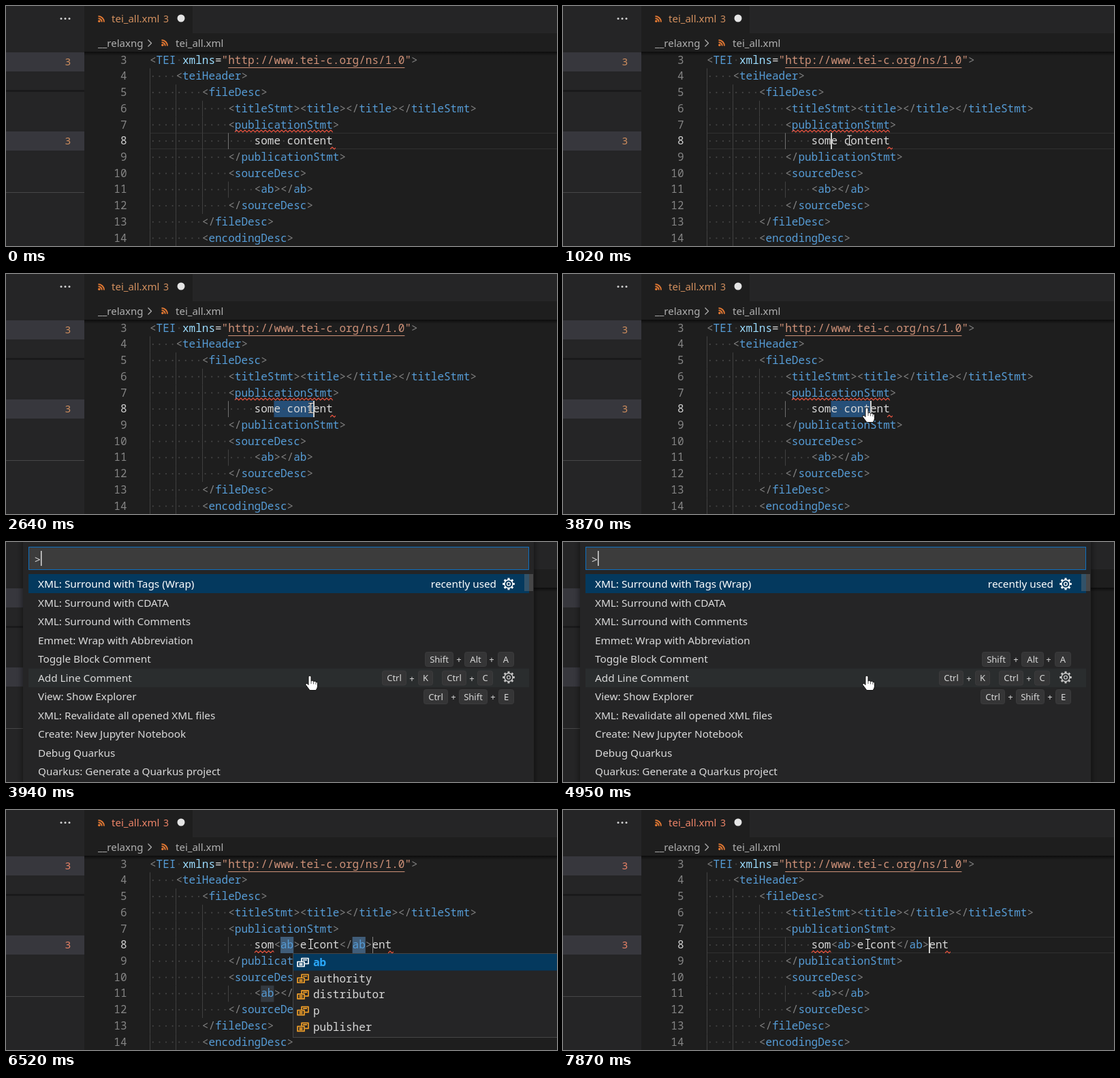
An HTML page with a canvas for the animation above (8 s loop, 809 by 352 pixels).

```html
<!DOCTYPE html>
<html lang="en">
<head>
<meta charset="utf-8">
<title>Surround with tags</title>
<style>
html, body { margin: 0; width: 809px; height: 352px; overflow: hidden; background: #1e1e1e; }
canvas { display: block; }
</style>
</head>
<body>
<canvas id="stage" width="809" height="352"></canvas>
<script>
const ctx = document.getElementById('stage').getContext('2d');
const LOOP = 8000, CHAR = 9.6, LEFT = 211, LINE = 23.73;
const mono = weight => `${weight} 16px "Noto Sans Mono", "DejaVu Sans Mono", monospace`;
const ui = size => `${size}px "Noto Sans", "Open Sans", sans-serif`;
const BLUE = '#569cd6', GREY = '#808080', TEXT = '#d8d8d8', STRING = '#ce9178', RED = '#ee5540';
const MENU = '#dadada';

const colX = col => LEFT + col * CHAR;
const lineY = n => 186.3 + (n - 8) * LINE;

function box(x, y, w, h, color) {
  ctx.fillStyle = color;
  ctx.fillRect(x, y, w, h);
}

function label(str, x, y, color, font, align = 'left') {
  ctx.font = font;
  ctx.textAlign = align;
  ctx.fillStyle = color;
  ctx.fillText(str, x, y);
}

function disc(x, y, r, color) {
  ctx.fillStyle = color;
  ctx.beginPath();
  ctx.arc(x, y, r, 0, 7);
  ctx.fill();
}

function path(d, x, y, color, width, fill) {
  const p = new Path2D(d);
  ctx.save();
  ctx.translate(x, y);
  if (fill) { ctx.fillStyle = fill; ctx.fill(p); }
  ctx.strokeStyle = color;
  ctx.lineWidth = width;
  ctx.lineJoin = 'round';
  ctx.stroke(p);
  ctx.restore();
}

// Editor text

function segments(parts, col, n) {
  for (const [str, color] of parts) {
    label(str, colX(col), lineY(n) + 17, color, mono(500));
    for (let i = 0; i < str.length; i++) if (str[i] === ' ') spaceDot(col + i, n);
    col += str.length;
  }
}

function spaceDot(col, n) {
  disc(colX(col + .5), lineY(n) + 11.8, 1.1, '#454545');
}

function markup(str) {
  let inTag = false;
  return str.match(/<\/?|>|[^<>]+/g).map(s => {
    if (/[<>]/.test(s)) { inTag = s[0] === '<'; return [s, GREY]; }
    return [s, inTag ? BLUE : TEXT];
  });
}

function squiggle(x1, x2, y) {
  ctx.save();
  ctx.beginPath();
  ctx.rect(x1, y - 3, x2 - x1, 6);
  ctx.clip();
  ctx.beginPath();
  for (let x = x1, i = 0; x <= x2 + 3; x += 3, i++) ctx.lineTo(x, y + (i % 2 ? -1.4 : 1.4));
  ctx.strokeStyle = RED;
  ctx.lineWidth = 1.2;
  ctx.stroke();
  ctx.restore();
}

function caret(col) {
  box(Math.round(colX(col)), 186, 2, 24, '#d0d0ce');
}

// Window parts

function feedIcon(x, y) {
  disc(x - 3.2, y + 3.2, 1.7, '#e37933');
  path('M-4.5-.8A5.3 5.3 0 0 1 .8 4.5M-4.5-4A8.5 8.5 0 0 1 4 4.5', x, y, '#e37933', 1.9);
}

function sidebar(badge) {
  box(0, 0, 115, 352, '#252526');
  for (let i = -1; i < 2; i++) disc(87 + i * 6, 18.5, 1.5, '#d0d0d0');
  box(0, 68, 115, 28, '#37373d');
  box(0, 184, 115, 28, '#37373d');
  box(0, 123, 115, 3, '#1a1a1b');
  box(0, 273, 115, 1, '#464647');
  label('3', 91, 87, badge, ui(14.5), 'center');
  label('3', 91, 203, badge, ui(14.5), 'center');
}

function header(badge) {
  box(115, 0, 694, 40, '#252526');
  box(115, 0, 159, 40, '#1e1e1e');
  box(115, 40, 694, 28, '#1e1e1e');
  feedIcon(140, 19);
  label('tei_all.xml', 155, 24, badge, ui(15));
  label('3', 235, 24, badge, ui(14), 'center');
  disc(257, 18, 5.5, '#e4e4e4');
  label('__relaxng', 135, 60, '#b0b0b0', ui(15));
  path('M-2.5-5L2.5 0L-2.5 5', 211, 54.5, '#b0b0b0', 1.3);
  feedIcon(233, 54);
  label('tei_all.xml', 249, 60, '#b0b0b0', ui(15));
  const shade = ctx.createLinearGradient(0, 67, 0, 73);
  shade.addColorStop(0, 'rgba(0,0,0,.6)');
  shade.addColorStop(1, 'rgba(0,0,0,0)');
  box(115, 67, 694, 6, shade);
}

const lines = [
  [0, ''],
  [4, '<teiHeader>'],
  [8, '<fileDesc>'],
  [12, '<titleStmt><title></title></titleStmt>'],
  [12, '<publicationStmt>'],
  [16, ''],
  [12, '</publicationStmt>'],
  [12, '<sourceDesc>'],
  [16, '<ab></ab>'],
  [12, '</sourceDesc>'],
  [8, '</fileDesc>'],
  [8, '<encodingDesc>']
];

function editor(t) {
  const wrapped = t >= 5020, snippet = wrapped && t < 7790;
  box(115, 68, 694, 284, '#1e1e1e');
  if (t < 1650 || t >= 7790) {
    box(LEFT, 186, 598, 1, '#303030');
    box(LEFT, 209, 598, 1, '#303030');
  }
  const picked = [1650, 1800, 2010, 2140, 2290, 2640].filter(at => t >= at).length;
  if (!wrapped) box(colX(19), 186, picked * CHAR, 24, '#264f78');
  if (snippet) {
    box(colX(20), 186, 2 * CHAR, 24, '#405d79');
    box(colX(31), 186, 2 * CHAR, 24, '#405d79');
    box(colX(17), lineY(11), 2 * CHAR, 24, '#343a41');
  }

  lines.forEach(([indent, str], i) => {
    const n = i + 3;
    for (let c = 0; c < indent; c += 4) {
      const active = n === 8 && c === 12 && !wrapped;
      box(Math.round(colX(c)), lineY(n), 1, LINE, active ? '#707070' : '#404040');
    }
    for (let c = 0; c < indent; c++) spaceDot(c, n);
    label(n, 177.5, lineY(n) + 17, n === 8 ? '#d0d0d0' : '#858585', mono(500), 'right');
    if (str) segments(markup(str), indent, n);
  });
  segments([['<', GREY], ['TEI', BLUE], [' ', TEXT], ['xmlns', '#9cdcfe'], ['=', TEXT],
    ['"http://www.tei-c.org/ns/1.0"', STRING], ['>', GREY]], 0, 3);
  box(colX(12), 90, 27 * CHAR, 1, STRING);

  const content = 'som<ab>e cont</ab>ent';
  segments(!wrapped ? [['some content', TEXT]] : t < 5100 ? [[content, TEXT]] : markup(content), 16, 8);

  if (t < 5550) squiggle(colX(13), colX(28), 183.5);
  else squiggle(colX(16), colX(19), 208);
  if (wrapped) squiggle(561, 569, 208.5);
  else squiggle(476, 484, 208.5);

  if (!wrapped) {
    const blinkOff = t < 870 || (t >= 1380 && t < 1650) || (t >= 3150 && t < 3650);
    if (!blinkOff) caret(19 + picked);
  } else if (snippet) {
    box(538, 186, 1, 24, '#858585');
    if (t < 5510 || (t >= 6020 && t < 6520) || (t >= 7080 && t < 7510)) {
      caret(22);
      caret(33);
    }
  } else caret(34);
}

function suggestions() {
  box(421, 210, 388, 124, '#454545');
  box(422, 211, 387, 122, '#252526');
  box(422, 211, 387, 24.5, '#04395e');
  ['ab', 'authority', 'distributor', 'p', 'publisher'].forEach((word, i) => {
    const y = 223.5 + i * LINE;
    const first = i === 0;
    label(word, 451, y + 5.5, first ? '#2aaaff' : TEXT, mono(first ? 700 : 500));
    path('M-2-1V-6H8V2H3M0-3.5H6M-8-1H2V6H-8ZM-5.5 1.5H-.5M-5.5 3.7H-.5', 436, y, first ? '#fff' : '#ee9d28', 1.7);
  });
}

// Command palette

const commands = ['XML: Surround with Tags (Wrap)', 'XML: Surround with CDATA', 'XML: Surround with Comments',
  'Emmet: Wrap with Abbreviation', 'Toggle Block Comment', 'Add Line Comment', 'View: Show Explorer',
  'XML: Revalidate all opened XML files', 'Create: New Jupyter Notebook', 'Debug Quarkus',
  'Quarkus: Generate a Quarkus project'];

function key(name, x, w, y) {
  ctx.beginPath();
  ctx.roundRect(x + .5, y - 10.5, w - 1, 21, 3);
  ctx.fillStyle = '#353536';
  ctx.fill();
  ctx.strokeStyle = '#3b3b3c';
  ctx.lineWidth = 1;
  ctx.stroke();
  label(name, x + w / 2, y + 4.8, MENU, ui(13), 'center');
}

function keys(list, y) {
  list.forEach(([name, x, w, plus]) => {
    key(name, x, w, y);
    if (plus) label('+', plus, y + 5, MENU, ui(13), 'center');
  });
}

function gear(x, y, color) {
  ctx.save();
  ctx.translate(x, y);
  ctx.strokeStyle = color;
  ctx.lineWidth = 1.4;
  ctx.beginPath();
  ctx.arc(0, 0, 6, 0, 7);
  ctx.moveTo(2.4, 0);
  ctx.arc(0, 0, 2.4, 0, 7);
  ctx.stroke();
  ctx.lineWidth = 3;
  for (let i = 0; i < 8; i++) {
    ctx.beginPath();
    ctx.moveTo(6, 0);
    ctx.lineTo(8.8, 0);
    ctx.stroke();
    ctx.rotate(Math.PI / 4);
  }
  ctx.restore();
}

function palette(t) {
  ctx.save();
  ctx.shadowColor = 'rgba(0,0,0,.6)';
  ctx.shadowBlur = 9;
  box(25, -10, 750, 380, '#252526');
  ctx.restore();
  box(33, 7, 735, 34, '#0e70c0');
  box(34, 8, 733, 32, '#3c3c3c');
  label('>', 42, 31, MENU, ui(15.3));
  if (t < 4450 || t >= 4950) box(51, 13, 1.5, 22, '#d8d8d8');
  box(33, 47, 735, 28, '#04395e');
  box(33, 185.5, 735, 27.5, '#2a2d2e');
  box(761, 47, 13, 25, 'rgba(121,121,121,.4)');
  commands.forEach((name, i) => label(name, 47, 67 + i * 27.5, i ? MENU : '#fff', ui(15.3)));
  label('recently used', 720, 67, '#fff', ui(15.3), 'right');
  gear(738, 61.5, '#fff');
  gear(738, 198.5, '#c4c4c4');
  keys([['Shift', 615, 42, 665], ['Alt', 673, 33, 713], ['A', 722, 24]], 172);
  keys([['Ctrl', 552, 36, 596], ['K', 605, 22], ['Ctrl', 640, 36, 684], ['C', 692, 23]], 199.5);
  keys([['Ctrl', 613, 36, 657], ['Shift', 665, 42, 715], ['E', 723, 23]], 227);
}

// Mouse

const track = [[200, 482, 249], [450, 430, 216], [650, 381, 196], [870, 394, 198], [1020, 420, 197], [1070, 447.5, 196.5]];

function mouse(t) {
  if (t < 200) return;
  if (t >= 3870 && t < 5020) {
    path('M-2 0Q0-2 2 0V7Q4 5 5.5 7.5Q8 6 9 8.5Q11 7.5 11.5 10V15Q11 18 9 20.5H0L-6 12.5Q-6.5 9.5-4 10.5L-2 12.5Z',
      446, 197, '#111', 1, '#fff');
    path('M2 7V11M5.5 8V11.5M9 9V12', 446, 197, '#333', .8);
    return;
  }
  const step = t < 870 ? 200 + Math.floor((t - 200) / 84) * 84 : t;
  const i = track.findIndex(p => p[0] > step);
  let [, x, y] = track[track.length - 1];
  if (i > 0) {
    const a = track[i - 1], b = track[i], k = (step - a[0]) / (b[0] - a[0]);
    x = a[1] + (b[1] - a[1]) * k;
    y = a[2] + (b[2] - a[2]) * k;
  }
  const beam = 'M-3.5-7H-1L0-6L1-7H3.5M0-6V6M-3.5 7H-1L0 6L1 7H3.5';
  path(beam, x, y, '#111', 2.6);
  path(beam, x, y, '#eee', 1.2);
}

const start = performance.now();

function draw() {
  const t = (performance.now() - start) % LOOP;
  const badge = t < 5020 ? '#d3905f' : '#ec8468';
  editor(t);
  header(badge);
  sidebar(badge);
  if (t >= 5020 && t < 7790) suggestions();
  if (t >= 3940 && t < 5020) palette(t);
  mouse(t);
  requestAnimationFrame(draw);
}

draw();
</script>
</body>
</html>
```
